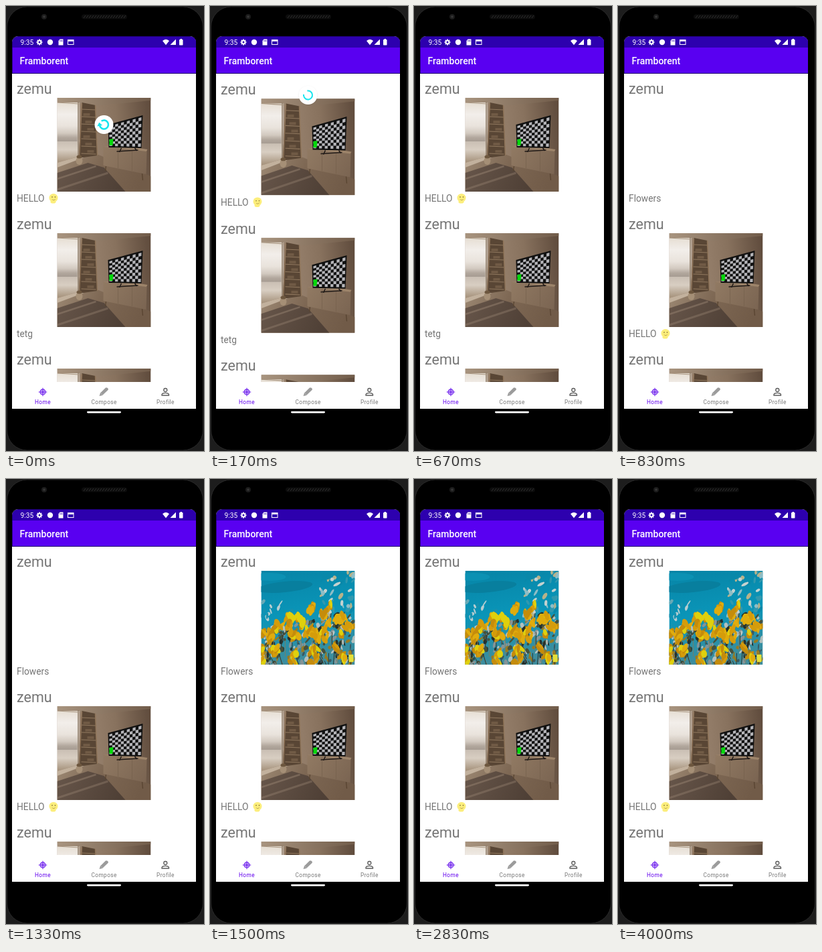
Recreate the animation shown at these times as an HTML page with a canvas. Size 296 by 664 pixels, loop 4170 ms.

```html
<!DOCTYPE html>
<html lang="en">
<head>
<meta charset="utf-8">
<title>Photo feed refresh</title>
<style>
html, body { margin: 0; width: 100%; height: 100%; overflow: hidden; background: #000; }
canvas { display: block; width: 296px; height: 664px; }
</style>
</head>
<body>
<canvas id="stage"></canvas>
<script>
const W = 296, H = 664, LOOP = 4170, TAU = Math.PI * 2;
const ROW = 202, LIST_TOP = 101, LIST_BOTTOM = 561;
const APP = 'Framborent', USER = 'zemu';
const canvas = document.getElementById('stage');
const dpr = window.devicePixelRatio || 1;
canvas.width = W * dpr;
canvas.height = H * dpr;
const ctx = canvas.getContext('2d');

// Each step holds until the next one starts.
const STEPS = [
  { at: 0, stretch: 0, spinner: { y: 177, from: -2.2, to: 2.95, arrow: true } },
  { at: 170, stretch: 1, spinner: { y: 133, from: -1.75, to: 3.3 } },
  { at: 330, stretch: 0.12, spinner: { y: 132, from: -1.7, to: 2.6 } },
  { at: 500, stretch: 0 },
  { at: 830, stretch: 0, refreshed: true },
  { at: 1500, stretch: 0, refreshed: true, loaded: true }
];

function rect(x, y, w, h, color) {
  ctx.fillStyle = color;
  ctx.fillRect(x, y, w, h);
}
function poly(points, color) {
  ctx.beginPath();
  points.forEach(([x, y]) => ctx.lineTo(x, y));
  ctx.closePath();
  ctx.fillStyle = color;
  ctx.fill();
}
function round(x, y, w, h, r, color) {
  ctx.beginPath();
  ctx.roundRect(x, y, w, h, r);
  ctx.fillStyle = color;
  ctx.fill();
}
function ellipse(x, y, rx, ry, color, angle = 0) {
  ctx.beginPath();
  ctx.ellipse(x, y, rx, ry, angle, 0, TAU);
  ctx.fillStyle = color;
  ctx.fill();
}
function arc(x, y, r, from, to, color, width) {
  ctx.beginPath();
  ctx.arc(x, y, r, from, to);
  ctx.strokeStyle = color;
  ctx.lineWidth = width;
  ctx.stroke();
}
function line(x1, y1, x2, y2, color, width) {
  ctx.beginPath();
  ctx.moveTo(x1, y1);
  ctx.lineTo(x2, y2);
  ctx.strokeStyle = color;
  ctx.lineWidth = width;
  ctx.stroke();
}
function text(str, x, y, size, color, weight = 400, spacing = 0) {
  ctx.font = `${weight} ${size}px Roboto, sans-serif`;
  ctx.letterSpacing = spacing + 'px';
  ctx.fillStyle = color;
  ctx.fillText(str, x, y);
}
function gradient(x1, y1, x2, y2, ...colors) {
  const g = ctx.createLinearGradient(x1, y1, x2, y2);
  colors.forEach((c, i) => g.addColorStop(i / (colors.length - 1), c));
  return g;
}
function seeded(seed) {
  return () => (seed = seed * 16807 % 2147483647) / 2147483647;
}

function drawTv() {
  poly([[76, 40], [128, 26], [126, 75], [77, 74]], '#111');
  const point = (u, v) => {
    const top = 42 - 13 * u, bottom = 72 + u;
    return [78 + 48 * u - v * u, top + (bottom - top) * v];
  };
  const cols = 11, rows = 9;
  for (let r = 0; r < rows; r++) {
    for (let c = 0; c < cols; c++) {
      if ((r + c) % 2) continue;
      const u = c / cols, v = r / rows, u2 = (c + 1) / cols, v2 = (r + 1) / rows;
      poly([point(u, v), point(u2, v), point(u2, v2), point(u, v2)], '#b4b4b8');
    }
  }
  poly([[78, 62], [84, 61], [83, 71], [78, 71]], '#05d80b');
  line(89, 80, 121, 78, '#201a17', 1.5);
  line(96, 75, 93, 81, '#201a17', 1.5);
  line(116, 75, 119, 79, '#201a17', 1.5);
}

function drawRoom() {
  rect(0, 0, 140, 140, gradient(40, 50, 140, 40, '#9a8470', '#88725e', '#614d3e'));
  poly([[0, 0], [140, 0], [140, 4], [58, 12], [0, 6]], gradient(0, 0, 140, 0, '#a8947f', '#715c4a'));
  // Window and daylight
  rect(0, 7, 33, 90, gradient(0, 7, 0, 95, '#e6ded3', '#f2eeea', '#e9e3dc', '#c3b8ad', '#d8cec2', '#a8957f'));
  rect(0, 53, 30, 12, gradient(0, 53, 0, 65, 'rgba(130,120,112,0)', 'rgba(130,120,112,.5)'));
  line(31.5, 6, 31.5, 90, '#8b7864', 1.5);
  line(0, 7, 33, 9, '#a89580', 1.2);
  // Floor and rug
  poly([[0, 97], [34, 87], [62, 85], [140, 117], [140, 140], [0, 140]],
    gradient(0, 90, 120, 140, '#9b8772', '#7d6753', '#715b48'));
  poly([[0, 112], [46, 97], [70, 104], [102, 140], [0, 140]], gradient(0, 100, 90, 140, '#67564a', '#4f4036'));
  line(0, 121, 58, 102, 'rgba(150,130,112,.5)', 2.5);
  line(0, 137, 76, 112, 'rgba(150,130,112,.4)', 3);
  poly([[0, 97], [34, 87], [40, 89], [0, 104]], '#c2b19d');
  // Bookshelf
  poly([[37, 7], [57, 11], [60, 86], [32, 90]], '#594635');
  for (let i = 0; i < 7; i++) {
    const y = 17 + i * 11;
    line(36, y, 58, y + 1, '#927a60', 1);
    if (i < 6) rect(39 + i % 3 * 3, y + 6, 10, 4, '#705a45');
  }
  line(37, 8, 33, 90, '#8b7157', 1.5);
  line(57, 11, 60, 86, '#8e7459', 1.5);
  ellipse(33, 94, 5, 6, '#a58f76');
  ellipse(33, 88, 4, 2.5, '#6d573f');
  // Cabinet
  poly([[69, 73], [91, 70], [135, 77], [133, 81]], '#9d846a');
  poly([[69, 73], [134, 80], [133, 114], [69, 101]], gradient(69, 70, 134, 110, '#917a63', '#7b6552'));
  line(91, 76, 91, 105, '#75604c', .7);
  line(112, 78, 112, 109, '#75604c', .7);
  line(73, 102, 72, 109, '#584431', 1.3);
  line(127, 113, 128, 123, '#584431', 1.3);
  drawTv();
}

function drawFlowers() {
  const random = seeded(421);
  const pick = list => list[Math.floor(random() * list.length)];
  const scatter = (count, place, size, colors) => {
    for (let i = 0; i < count; i++) {
      const [x, y] = place();
      ellipse(x, y, size * (.5 + random()), size * (1 + random() * 1.8), pick(colors), random() * 1.6 - .5);
    }
  };
  rect(0, 0, 140, 140, gradient(0, 0, 20, 140, '#0784a6', '#0a95b8', '#3e8d9d'));
  ellipse(35, 24, 42, 8, '#087f9e', -.1);
  ellipse(12, 9, 25, 6, '#0b91b3');
  // Blurred blossoms, then stems, then the near flowers
  scatter(42, () => [88 + random() * 52, random() * 72], 2.3, ['#8ebdc6', '#c5d2d0', '#3298ae', '#0988a9', '#b7b28a']);
  scatter(22, () => [random() * 45, 46 + random() * 45], 1.8, ['#b7cdd0', '#68a9b6', '#1790ae']);
  const meadow = () => {
    const x = random() * 140, top = 92 - x * .25;
    return [x, top + random() * (140 - top)];
  };
  scatter(240, meadow, 2, ['#24302d', '#46513b', '#849497', '#977b22', '#3b5961', '#b4c0bd']);
  for (let i = 0; i < 35; i++) {
    const [x, y] = meadow();
    line(x, y, x + random() * 18 - 4, y + 24, pick(['#2b3631', '#72806b']), 1);
  }
  for (let i = 0; i < 48; i++) {
    const x = random() * 138, top = 78 - Math.min(x, 75) * .35;
    const y = top + random() * (137 - top);
    for (let p = 0; p < 3; p++) {
      ellipse(x + random() * 8 - 4, y + random() * 8 - 4, 2 + random() * 2.5, 5 + random() * 4,
        pick(['#d59c0b', '#c58c0b', '#e0ac0d', '#dfd00d']), random() * 1.8 - .9);
    }
  }
  rect(131, 125, 7, 11, '#e5df37');
}

function drawPhoto(paint, top, bottom) {
  ctx.save();
  ctx.translate(76.5, top);
  ctx.scale(1, (bottom - top) / 140);
  ctx.beginPath();
  ctx.rect(0, 0, 140, 140);
  ctx.clip();
  paint();
  ctx.restore();
}

function drawMeltingFace(x, y) {
  ellipse(x, y - .7, 6.5, 6.3, '#fcee7c');
  ellipse(x - .5, y + 5.2, 4, 2.3, '#fcee7c');
  ellipse(x - 2, y - 2, .8, .9, '#8f7a3c');
  ellipse(x + 2.5, y - 2, .8, .9, '#8f7a3c');
  arc(x + .2, y - .2, 2.8, .4, 2.5, '#ab9247', .8);
}

function drawList(step) {
  ctx.save();
  ctx.beginPath();
  ctx.rect(9, LIST_TOP, 275, LIST_BOTTOM - LIST_TOP);
  ctx.clip();
  const place = y => {
    const u = y - LIST_TOP;
    return y + step.stretch * (.0362 * u - 3.48e-5 * u * u);
  };
  const posts = [
    { photo: drawRoom, caption: 'HELLO', face: true },
    { photo: drawRoom, caption: 'tetg' }
  ];
  if (step.refreshed) {
    posts.unshift({ photo: step.loaded && drawFlowers, caption: 'Flowers' });
  } else {
    posts.push({ photo: drawRoom, caption: '' });
  }
  // The third post peeks out above the tabs in both states.
  posts.forEach((post, i) => {
    const y = i * ROW;
    text(USER, 16, place(y + 131), 21.5, '#757575');
    if (post.photo) drawPhoto(post.photo, place(y + 137), place(y + 277));
    text(post.caption, 16, place(y + 292), 13.8, '#757575');
    if (post.face) drawMeltingFace(71, place(y + 287));
  });
  if (step.spinner) drawSpinner(step.spinner);
  ctx.restore();
}

function drawSpinner({ y, from, to, arrow }) {
  const x = 146.5, r = 6.5, color = '#18e5ee';
  ctx.save();
  ctx.shadowColor = 'rgba(0,0,0,.12)';
  ctx.shadowBlur = 1.5 * dpr;
  ctx.shadowOffsetY = .5 * dpr;
  ellipse(x, y, 14, 14, '#fff');
  ctx.restore();
  arc(x, y, r, from, to, color, arrow ? 2.6 : 2);
  if (!arrow) return;
  ctx.save();
  ctx.translate(x + r * Math.cos(to), y + r * Math.sin(to));
  ctx.rotate(to);
  poly([[-4, -.5], [4, -.5], [0, 4.5]], color);
  ctx.restore();
}

function drawDevice() {
  rect(0, 0, W, H, '#1d1d1d');
  round(1.5, 1, 293, 662, 30, '#000');
  ctx.strokeStyle = '#2b2b2b';
  ctx.lineWidth = 1;
  ctx.stroke();
  ellipse(57, 16, 4, 4, '#1c1c1c');
  ellipse(57, 16, 1.7, 1.7, '#383838');
  round(113, 12.5, 68, 7, 3.5, '#0c0c0c');
  for (let x = 116; x < 178; x += 4) line(x, 18, x + 3, 14, '#303030', 1);
  round(9, 45, 275, 556, [9, 9, 0, 0], '#fff');
  round(121, 604.7, 51, 2.8, 1.4, '#fff');
}

function drawGear(x, y) {
  for (let i = 0; i < 4; i++) {
    const dx = 4.4 * Math.cos(i * TAU / 8), dy = 4.4 * Math.sin(i * TAU / 8);
    line(x - dx, y - dy, x + dx, y + dy, '#fff', 1.9);
  }
  ellipse(x, y, 3.3, 3.3, '#fff');
  ellipse(x, y, 1.4, 1.4, '#2d00ae');
}

function drawHeader() {
  round(9, 45, 275, 56, [9, 9, 0, 0], '#1c0068');
  round(9.7, 45.7, 274.3, 18, [8, 8, 0, 0], '#2d00ae');
  rect(9.7, 62, 274.3, 38, '#5900f1');
  text('9:35', 21.5, 57.5, 10.2, '#fff');
  drawGear(50, 54);
  ellipse(66, 54, 4.2, 4.2, '#fff');
  poly([[80.5, 49.5], [85.5, 49.5], [85.5, 58.5], [78.5, 58.5], [78.5, 52]], '#fff');
  for (let x = 80.5; x < 85; x += 1.6) rect(x, 51, .7, 2, '#2d00ae');
  ctx.strokeStyle = '#fff';
  ctx.lineWidth = 1;
  ctx.strokeRect(92.5, 50.5, 8.5, 7);
  rect(92.5, 50.5, 8.5, 2.3, '#fff');
  poly([[234, 52], [236.3, 50.4], [239, 49.8], [241.7, 50.4], [244, 52], [239, 58.3]], '#fff');
  poly([[245.5, 58], [254, 49.5], [254, 58]], '#fff');
  round(259, 50, 5.5, 8.5, .8, '#fff');
  rect(260.5, 49, 2.5, 1.2, '#fff');
  text(APP, 20.5, 87, 14, '#fff', 500);
}

function drawTabs() {
  const purple = '#7a35ee', gray = '#777';
  rect(9, LIST_BOTTOM, 275, 40, '#fff');
  ellipse(55, 576, 4, 4, '#c6a5f7');
  arc(55, 576, 4, 0, TAU, purple, 1.3);
  line(48.7, 576, 61.3, 576, purple, 1);
  line(55, 569.7, 55, 582.3, purple, 1);
  ellipse(55, 576, 1.6, 1.6, purple);
  poly([[139.5, 582], [141, 577.5], [149, 569.5], [151.2, 569.5], [153, 571.3], [152.5, 573], [144, 581]], '#9b9b9b');
  line(142, 578, 144, 580, '#c4c4c4', .8);
  arc(238.3, 573, 2.5, 0, TAU, '#5c5c5c', 1.3);
  ctx.beginPath();
  ctx.moveTo(233, 581);
  ctx.lineTo(233, 579.5);
  ctx.bezierCurveTo(234.5, 576.7, 242, 576.7, 243.5, 579.5);
  ctx.lineTo(243.5, 581);
  ctx.closePath();
  ctx.stroke();
  text('Home', 43, 594, 8.3, '#6200ee', 400, .4);
  text('Compose', 127.5, 594, 8.3, gray, 400, .4);
  text('Profile', 225, 594, 8.3, gray, 400, .4);
}

const start = performance.now();
function frame() {
  const now = (performance.now() - start) % LOOP;
  const step = STEPS.findLast(s => s.at <= now) || STEPS[0];
  ctx.setTransform(dpr, 0, 0, dpr, 0, 0);
  drawDevice();
  drawList(step);
  drawHeader();
  drawTabs();
  requestAnimationFrame(frame);
}
frame();
</script>
</body>
</html>
```
